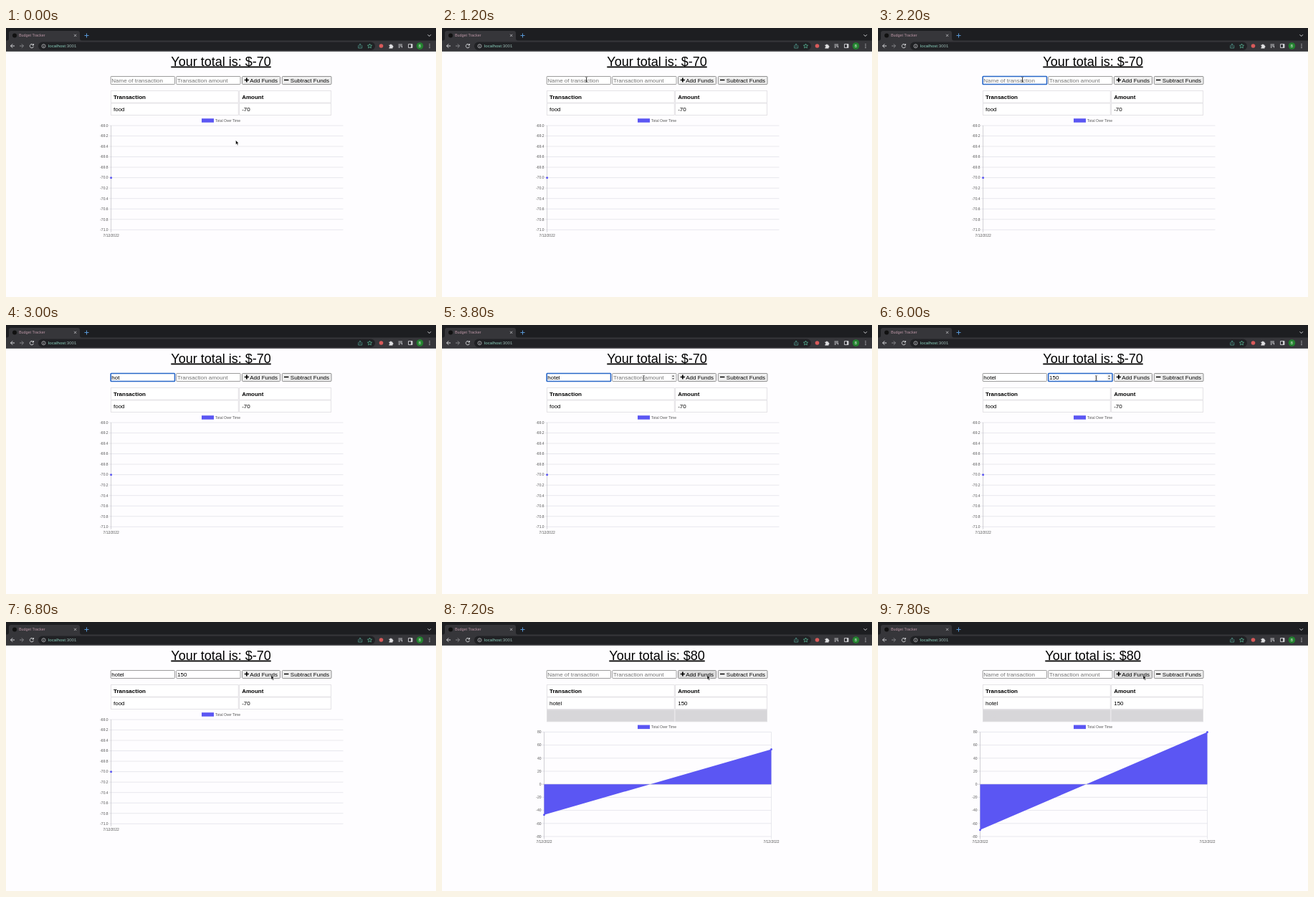
An HTML page for the animation above (8 s loop, 600 px wide and 375 px high).

```html
<!DOCTYPE html>
<html lang="en">
<head>
<meta charset="utf-8">
<title>Budget Tracker</title>
<style>
  html, body { margin: 0; width: 100%; height: 100%; overflow: hidden; background: #fefdff; }
  svg { display: block; width: 100%; height: 100%; font: 8px "Liberation Sans", Arial, sans-serif; }
  .bold { font-weight: bold; }
  .title { font-size: 18px; text-anchor: middle; text-decoration: underline; }
  .small { font-size: 5px; fill: #555; }
  .end { text-anchor: end; }
  .mid { text-anchor: middle; }
  .field { fill: #fff; stroke: #858585; stroke-width: .8; }
  .focus { stroke: #2867c8; stroke-width: 1.6; }
  .button { fill: #efefef; stroke: #777; stroke-width: .8; }
  .pressed { fill: #dcdcdc; }
  .cell { fill: #fff; stroke: #dedde0; stroke-width: .8; }
  .shaded { fill: #d7d6d9; }
  .grid { stroke: #e3e2e9; stroke-width: .8; fill: none; }
  .zero { stroke: #c4c3cb; }
  .series { fill: #5b56f3; }
  .icon { fill: none; stroke: #d4d5d8; stroke-width: 1; }
</style>
</head>
<body>
<svg viewBox="0 0 600 375" preserveAspectRatio="none">
  <g id="browser">
    <rect width="600" height="32.5" fill="#1d1e21"/>
    <path d="M1 17.5q3 0 3-3V7q0-3 3-3h93q3 0 3 3v7.5q0 3 3 3H600v15H0v-15z" fill="#36363a"/>
    <rect x="45" y="19.5" width="470" height="11.5" rx="5.7" fill="#202124"/>
    <circle cx="12" cy="10.5" r="3" fill="#111"/>
    <text x="18" y="12.3" font-size="5.4" fill="#b994a4">Budget Tracker</text>
    <text x="59" y="27.2" font-size="6.1" fill="#9bb9b3"><tspan fill="#8bd0bd">localhost</tspan>:3001</text>
    <g class="icon">
      <path d="M95 8.8l3.2 3.2m0-3.2L95 12" stroke-width=".7"/>
      <path d="M109.5 10.5h6m-3-3v6" stroke="#5797d6"/>
      <path d="M588.5 9.3l2.2 2.2 2.2-2.2"/>
      <path d="M12 25H6.6m2.6-2.7L6.500 25l2.700 2.700"/>
      <path d="M19 25h5.400m-2.600-2.700l2.700 2.700-2.700 2.700" stroke="#85868a"/>
      <path d="M38 23.600a2.600 2.600 0 1 0 .4 2.200M38.500 22v2h-2"/>
      <circle cx="52.500" cy="25.200" r="2.500" stroke-width=".7"/>
      <path d="M52.500 24.800v1.800m0-3v.6" stroke-width=".7"/>
      <path d="M492.300 24.500h-.6v3.500h5v-3.500h-.6m-2 2V22m-1.500 1.500l1.500-1.500 1.500 1.500" stroke="#57a89a" stroke-width=".7"/>
      <path d="M507.500 22l.9 2 2.200.2-1.700 1.500.5 2.200-1.900-1.200-1.900 1.200.5-2.200-1.700-1.500 2.200-.2z" stroke="#5fc7a2" stroke-width=".7"/>
      <path d="M547.500 23h5.500m-5.500 2h5.500m-5.500 2h2.500m2.500-2v2.500" stroke-width=".9"/>
      <path d="M561.500 22.500h5.500v5h-5.500zM565.800 22.500v5" stroke-width=".9"/>
      <path d="M566 22.500v5" stroke-width="1.800"/>
    </g>
    <circle cx="523.500" cy="25" r="2.800" fill="#d95a5a"/>
    <path d="M534.500 23.500h1.500a1 1 0 0 1 2 0h1.500v1.500a1 1 0 0 1 0 2v1.500h-5v-1.500a1 1 0 0 0 0-2z" fill="#e0e0e2"/>
    <circle cx="577.500" cy="25" r="4.800" fill="#23822f"/>
    <text x="577.500" y="26.900" font-size="5" class="mid" fill="#e8f4e8">B</text>
    <g fill="#d4d5d8"><circle cx="591" cy="22.600" r=".7"/><circle cx="591" cy="25" r=".7"/><circle cx="591" cy="27.400" r=".7"/></g>
  </g>

  <text id="total" class="title" x="300" y="52.500"></text>

  <rect id="nameField" class="field" x="146.200" y="67.500" width="89.300" height="11" rx=".8"/>
  <rect id="amountField" class="field" x="237.700" y="67.500" width="89.300" height="11" rx=".8"/>
  <text id="nameText" x="147.300" y="75.700"></text>
  <text id="amountText" x="239" y="75.700"></text>
  <g id="spinner">
    <rect x="319.500" y="69" width="6" height="8" fill="#efefef"/>
    <path d="M321 72l1.500-2 1.500 2zm0 2l1.500 2 1.500-2z" fill="#555"/>
  </g>
  <path id="caret" d="M243.500 69.300v7.500" stroke="#000" stroke-width=".8"/>

  <rect id="addButton" class="button" x="329.500" y="67.500" width="53" height="11" rx="1"/>
  <rect class="button" x="385.300" y="67.500" width="68.700" height="11" rx="1"/>
  <path d="M332.700 72.500h6.200m-3.100-3.100v6.200M388 72.500h6.400" stroke="#000" stroke-width="1.700"/>
  <text x="340.200" y="75.700">Add Funds</text>
  <text x="396.800" y="75.700">Subtract Funds</text>

  <g id="before"></g>
  <g id="after"></g>

  <path id="arrow" d="M0 0v6l1.400-1.300 1 2.300 1.100-.5-1-2.200h1.900z" stroke="#fff" stroke-width=".5"/>
  <path id="beam" d="M-1.300-3.500q1.300 0 1.300 1v5q0 1-1.300 1m2.600-7q-1.300 0-1.300 1v5q0 1 1.300 1" fill="none" stroke="#222" stroke-width=".7"/>
</svg>
<script>
const LOOP = 8000, STEP = 200, SUBMIT = 6946;
const el = id => document.getElementById(id);
const show = (id, on) => el(id).setAttribute('visibility', on ? 'visible' : 'hidden');
const text = (x, y, str, cls = '') => `<text x="${x}" y="${y}" class="${cls}">${str}</text>`;
const line = (d, cls = '') => `<path d="${d}" class="grid ${cls}"/>`;

function row(y, name, amount, cls = '') {
  const cell = (x, w, str) =>
    `<rect x="${x}" y="${y}" width="${w}" height="16.500" class="cell ${cls}"/>` + text(x + 3.600, y + 11.200, str, cls);
  return cell(146.400, 177.800, name) + cell(325.600, 128, amount);
}

function chart({ top, bottom, left, right, max, step, count, digits, dates }) {
  let out = `<rect x="273" y="${top - 9.800}" width="17" height="5.500" class="series"/>` +
    text(292, top - 5.200, 'Total Over Time', 'small');
  for (let i = 0; i <= count; i++) {
    const y = top + (bottom - top) * i / count, value = max - step * i;
    out += line(`M${left - 3} ${y}H${right}`, Math.abs(value) < 1e-6 ? 'zero' : '') +
      text(left - 4, y + 1.800, value.toFixed(digits), 'small end');
  }
  dates.forEach((x, i) => {
    out += line(`M${x} ${top}V${bottom + 3.500}`, i ? '' : 'zero') +
      text(x, bottom + 9.300, '7/12/2022', 'small mid');
  });
  return out;
}

const LEFT = 142.500, RIGHT = 459.500, ZERO = 226.200, UNIT = .91;

el('before').innerHTML =
  row(87.600, 'Transaction', 'Amount', 'bold') + row(105, 'food', '-70') +
  chart({ top: 136, bottom: 281.300, left: 146.600, right: 470.500, max: -69, step: .2, count: 10, digits: 1, dates: [146.600] }) +
  '<circle cx="146.600" cy="208.700" r="1.500" class="series"/>';
el('after').innerHTML =
  row(87.600, 'Transaction', 'Amount', 'bold') + row(105, 'hotel', '150') + row(122.400, 'food', '-70', 'shaded') +
  chart({ top: 153.400, bottom: 299, left: LEFT, right: RIGHT, max: 80, step: 20, count: 8, digits: 0, dates: [LEFT, RIGHT] }) +
  '<path id="area" class="series"/><circle id="low" r="1.500" class="series"/><circle id="high" r="1.500" class="series"/>';

// Pointer stops: time, x, y
const pointer = [
  [0, 320.500, 156.500], [200, 320.500, 156.500], [1200, 201.500, 72], [3400, 201.500, 72],
  [3800, 281.500, 74], [5800, 281.500, 74], [6400, 370, 74.300], [LOOP, 370, 74.300]
];

function pointerAt(t) {
  const i = pointer.findIndex(p => p[0] > t);
  const [t0, x0, y0] = pointer[i - 1], [t1, x1, y1] = pointer[i];
  const k = (t - t0) / (t1 - t0), e = k * k * (3 - 2 * k);
  return [x0 + (x1 - x0) * e, y0 + (y1 - y0) * e];
}

function fill(id, value, hint) {
  el(id).textContent = value || hint;
  el(id).setAttribute('fill', value ? '#000' : '#757575');
}

function setPoint(id, x, y) {
  el(id).setAttribute('cx', x);
  el(id).setAttribute('cy', y);
}

function draw(t) {
  const done = t >= SUBMIT;
  const typed = (word, start) => done ? '' : word.slice(0, Math.max(0, Math.floor((t - start) / STEP) + 1));
  const amount = typed('150', 5000);
  const nameFocus = t >= 1400 && t < 4200, amountFocus = t >= 4200 && t < 6600;

  el('total').textContent = `Your total is: $${done ? 80 : -70}`;
  fill('nameText', typed('hotel', 2600), 'Name of transaction');
  fill('amountText', amount, 'Transaction amount');
  el('nameField').classList.toggle('focus', nameFocus);
  el('amountField').classList.toggle('focus', amountFocus);
  el('addButton').classList.toggle('pressed', done);
  show('spinner', t >= 3600 && amountFocus || t >= 3600 && nameFocus);
  show('caret', amountFocus && t >= 4400 && (t - 5000 + 1200) % 1200 < 600);
  el('caret').setAttribute('transform', `translate(${(amount.length - 1) * 4.450} 0)`);

  const [x, y] = pointerAt(t);
  const overField = y > 67 && y < 79 && x < 327;
  const hidden = t >= 2600 && t < 3400 || t >= 5000 && t < 5800;
  show('arrow', !overField && !hidden);
  show('beam', overField && !hidden);
  for (const id of ['arrow', 'beam']) el(id).setAttribute('transform', `translate(${x} ${y})`);

  show('before', !done);
  show('after', done);
  const grow = 1 - (1 - Math.max(0, t - SUBMIT) / 1054) ** 4;
  const low = ZERO + 70 * UNIT * grow, high = ZERO - 80 * UNIT * grow;
  const cross = LEFT + (RIGHT - LEFT) * 70 / 150;
  el('area').setAttribute('d', `M${LEFT} ${ZERO}V${low}L${cross} ${ZERO}L${RIGHT} ${high}V${ZERO}z`);
  setPoint('low', LEFT, low);
  setPoint('high', RIGHT, high);
}

function frame() {
  draw(Math.floor(performance.now() % LOOP / STEP) * STEP);
  requestAnimationFrame(frame);
}
frame();
</script>
</body>
</html>
```
